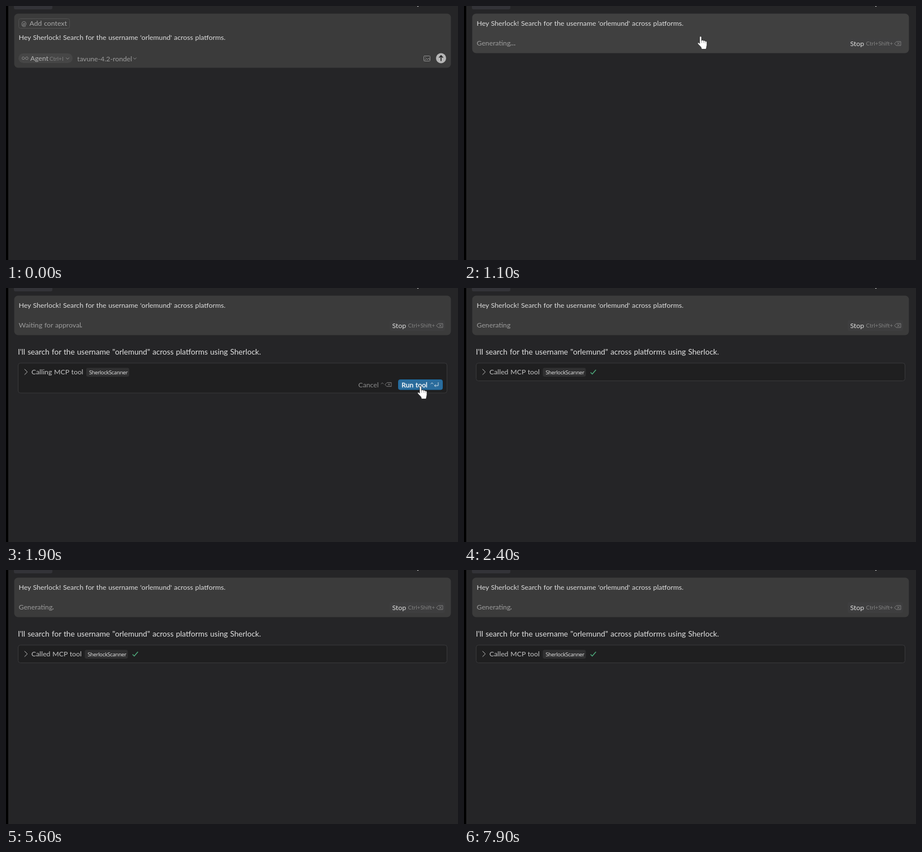
Recreate the animation shown at these times as an HTML page. Size 800 px wide and 450 px high, loop 8000 ms.

```html
<!DOCTYPE html>
<html lang="en">
<head>
<meta charset="utf-8">
<title>Chat tool call</title>
<style>
html, body { margin: 0; width: 100%; height: 100%; overflow: hidden; background: #252527; }
svg { display: block; width: 800px; height: 450px; }
text { font: 12.25px Lato, "Open Sans", sans-serif; fill: #dedede; word-spacing: .05em; white-space: pre; }
.dim { fill: #9c9c9c; }
.key { font-size: 10px; fill: #808080; }
.reply { font-size: 13.6px; fill: #e2e2e2; }
.tool { font-size: 12.3px; fill: #c4c4c4; }
.chip { font: 9.4px "Open Sans", sans-serif; letter-spacing: -.3px; fill: #e6e6e6; }
.line { fill: none; stroke: #8f8f8f; stroke-linecap: round; stroke-linejoin: round; }
</style>
</head>
<body>
<svg viewBox="0 0 800 450">
  <defs>
    <g id="chevron"><path class="line" d="M-2.5-1.2 0 1.3 2.5-1.2"/></g>
    <g id="backspace" class="line" stroke-width=".8">
      <path d="M0 0 3.5-3.5H11V3.5H3.5ZM5-1.8 8.6 1.8M8.6-1.8 5 1.8"/>
    </g>
  </defs>

  <rect width="800" height="450" fill="#252527"/>
  <rect width="4" height="450" fill="#000"/>
  <path d="M14 0H82V3Q82 6 79 6H17Q14 6 14 3Z" fill="#333338"/>
  <path d="M727.5 0H730.5L729 1.5Z" fill="#ddd"/>
  <rect id="card" x="14.5" y="13.5" width="773" height="96" rx="7" fill="#3b3b3b"/>
  <text id="prompt" x="22.5" y="59.5">Hey Sherlock! Search for the username 'orlemund' across platforms.</text>

  <g id="compose">
    <rect x="22.5" y="22.5" width="90" height="17" rx="3" fill="none" stroke="#515151"/>
    <text class="dim" x="27" y="35" style="font-size:11px">@</text>
    <text x="41.5" y="35" style="fill:#a9a9a9">Add context</text>
    <rect x="22" y="84" width="96" height="17" rx="8.5" fill="#464646"/>
    <path class="line" d="M33.5 92.5C32 90.8 31 90 30 90.2 28 90.6 28 94.4 30 94.8 33 95 34.5 90 37.5 90.2 39.5 90.6 39.5 94.4 37.5 94.8 36 95 35 94 33.5 92.5"/>
    <text x="43" y="97" style="fill:#b4b4b4">Agent</text>
    <text class="key" x="77" y="97">Ctrl+I</text>
    <use href="#chevron" x="109" y="93"/>
    <text class="dim" x="126" y="97.5">tavune-4.2-rondel</text>
    <use href="#chevron" x="228" y="93"/>
    <g class="line">
      <rect x="739.5" y="88.5" width="11" height="9" rx="1"/>
      <path d="M741 96 744 93 746 95 748 92.5 750 95M742.5 91H743"/>
    </g>
    <circle cx="770" cy="92.5" r="9" fill="#b6b6b6"/>
    <g id="ring" fill="none">
      <circle cx="770" cy="92.5" r="8.8" stroke="#3b3b3b" stroke-width="1"/>
      <circle cx="770" cy="92.5" r="10" stroke="#c8c8c8" stroke-width="1.2"/>
    </g>
    <path d="M770 97.5V88M766.5 91.5 770 88 773.5 91.5" fill="none" stroke="#222" stroke-width="1.7"/>
  </g>

  <g id="status">
    <text id="state" class="dim" x="22.5" y="70"></text>
    <g id="dots" fill="#9c9c9c"></g>
    <rect x="679" y="57" width="98" height="19" rx="3" fill="#404042" opacity=".6"/>
    <text x="683.5" y="71">Stop</text>
    <text class="key" x="711.5" y="70">Ctrl+Shift+</text>
    <use href="#backspace" x="762" y="66.5"/>
  </g>

  <text id="reply" class="reply" x="21" y="118">I'll search for the username "orlemund" across platforms using Sherlock.</text>

  <g id="tool">
    <rect id="box" x="21.5" y="133" width="759" height="53" rx="4" fill="#1f1f20" stroke="#39393b"/>
    <path class="line" style="stroke:#c0c0c0" d="M33 144 37.8 148.7 33 153.4"/>
    <text id="label" class="tool" x="45" y="153"></text>
    <g id="chip">
      <rect x="142" y="141.5" width="76" height="15.5" rx="3" fill="#303031"/>
      <text class="chip" x="147" y="152.5">SherlockScanner</text>
    </g>
    <path id="check" d="M224 149.5 227 152.5 233.5 145" fill="none" stroke="#4fae7e" stroke-width="1.4"/>
    <g id="buttons">
      <text x="623.5" y="175.5" style="fill:#8c8c8c">Cancel</text>
      <path class="line" style="stroke:#707070" d="M664 170 666 167.8 668 170"/>
      <use href="#backspace" x="671" y="171"/>
      <rect x="694.5" y="162.5" width="78" height="17.5" rx="3" fill="#2b6c9c" stroke="#1b6fa8"/>
      <text x="700" y="175.5" style="fill:#fff;stroke:#fff;stroke-width:.3">Run tool</text>
      <path class="line" style="stroke:#c9d9e5" d="M752 170 754 167.8 756 170M765 167.5V173H758.5M760.5 171 758.5 173 760.5 175"/>
    </g>
  </g>

  <g id="beam" fill="none" stroke-linecap="round">
    <path d="M-3-8Q-.5-8 0-6.5.5-8 3-8M0-6.5V6.5M-3 8Q-.5 8 0 6.5.5 8 3 8" stroke="#222" stroke-width="2.8"/>
    <path d="M-3-8Q-.5-8 0-6.5.5-8 3-8M0-6.5V6.5M-3 8Q-.5 8 0 6.5.5 8 3 8" stroke="#e8e8e8" stroke-width="1.3"/>
  </g>
  <g id="hand" stroke="#222" stroke-width=".8">
    <path d="M0 1.5C0-.8 3.2-.8 3.4 1.5V7.5C4.2 6 6.4 6 7 7.6 8 6.6 9.6 7 10 8.6 11.2 7.8 12.8 8.4 13 10V15.5L11.5 22.5H3.5L2.5 19-3 13.2C-4.2 11.6-2.8 10-1.2 11.2L0 12.4Z" fill="#fff"/>
    <path d="M3.4 7.5V11.5M7 7.6V11.5M10 8.6V12" fill="none" stroke="#888"/>
  </g>
</svg>
<script>
const LOOP = 8000, STEP = 100;
const $ = id => document.getElementById(id);
const show = (id, on) => { $(id).style.display = on ? '' : 'none'; };
const place = (id, [x, y]) => $(id).setAttribute('transform', `translate(${x} ${y})`);

// Pointer paths: [time, x, y]
const beamPath = [[300, 456, 66], [600, 436, 58], [900, 421, 53.5], [1100, 421, 53.5]];
const handPath = [[1100, 417, 54], [1300, 417, 54], [1500, 530, 105], [1700, 680, 165],
  [1900, 732, 174], [2000, 732, 174], [2100, 716, 346], [2200, 716, 346]];

function along(path, t) {
  const i = Math.max(1, path.findIndex(p => p[0] > t));
  const [t0, x0, y0] = path[i - 1], [t1, x1, y1] = path[i];
  const k = (t - t0) / (t1 - t0);
  return [x0 + (x1 - x0) * k, y0 + (y1 - y0) * k];
}

// The dots count down 3, 2, 1, 0; twelve changes fall on fourteen steps.
function dotCount(t) {
  const i = Math.floor(((t + 800) % 1400) / STEP);
  return [0, 3, 2, 1][(i - (i >= 7) - (i >= 13)) % 4];
}

const dots = [0, 1, 2].map(() => {
  const dot = document.createElementNS('http://www.w3.org/2000/svg', 'circle');
  dot.setAttribute('cy', 69);
  dot.setAttribute('r', .9);
  return $('dots').appendChild(dot);
});

function draw(now) {
  const t = Math.floor((now % LOOP) / STEP) * STEP;
  const sent = t >= 1100, waiting = t >= 1600 && t < 2000, done = t >= 2200;

  show('compose', !sent);
  show('status', sent);
  show('ring', t >= 900);
  $('card').setAttribute('height', sent ? 70 : 96);
  $('card').setAttribute('fill', sent && t < 1400 ? '#404040' : '#3b3b3b');
  $('prompt').setAttribute('y', sent ? 35 : 59.5);

  $('state').textContent = waiting ? 'Waiting for approval' : 'Generating';
  const n = dotCount(t);
  dots.forEach((dot, i) => {
    dot.setAttribute('cx', (waiting ? 133.5 : 83.3) + i * 3.2);
    dot.style.display = i < n ? '' : 'none';
  });

  show('reply', t >= 1400);
  show('tool', t >= 1600);
  show('buttons', waiting);
  show('check', done);
  $('box').setAttribute('height', waiting ? 53 : 31.5);
  $('label').textContent = done ? 'Called MCP tool' : 'Calling MCP tool';
  place('chip', [done ? -2.5 : 0, 0]);

  const beam = t >= 300 && !sent, hand = sent && !done;
  show('beam', beam);
  show('hand', hand);
  if (beam) place('beam', along(beamPath, t));
  if (hand) place('hand', along(handPath, t));
}

const start = performance.now();
function tick() {
  draw(performance.now() - start);
  requestAnimationFrame(tick);
}
draw(0);
requestAnimationFrame(tick);
</script>
</body>
</html>
```
